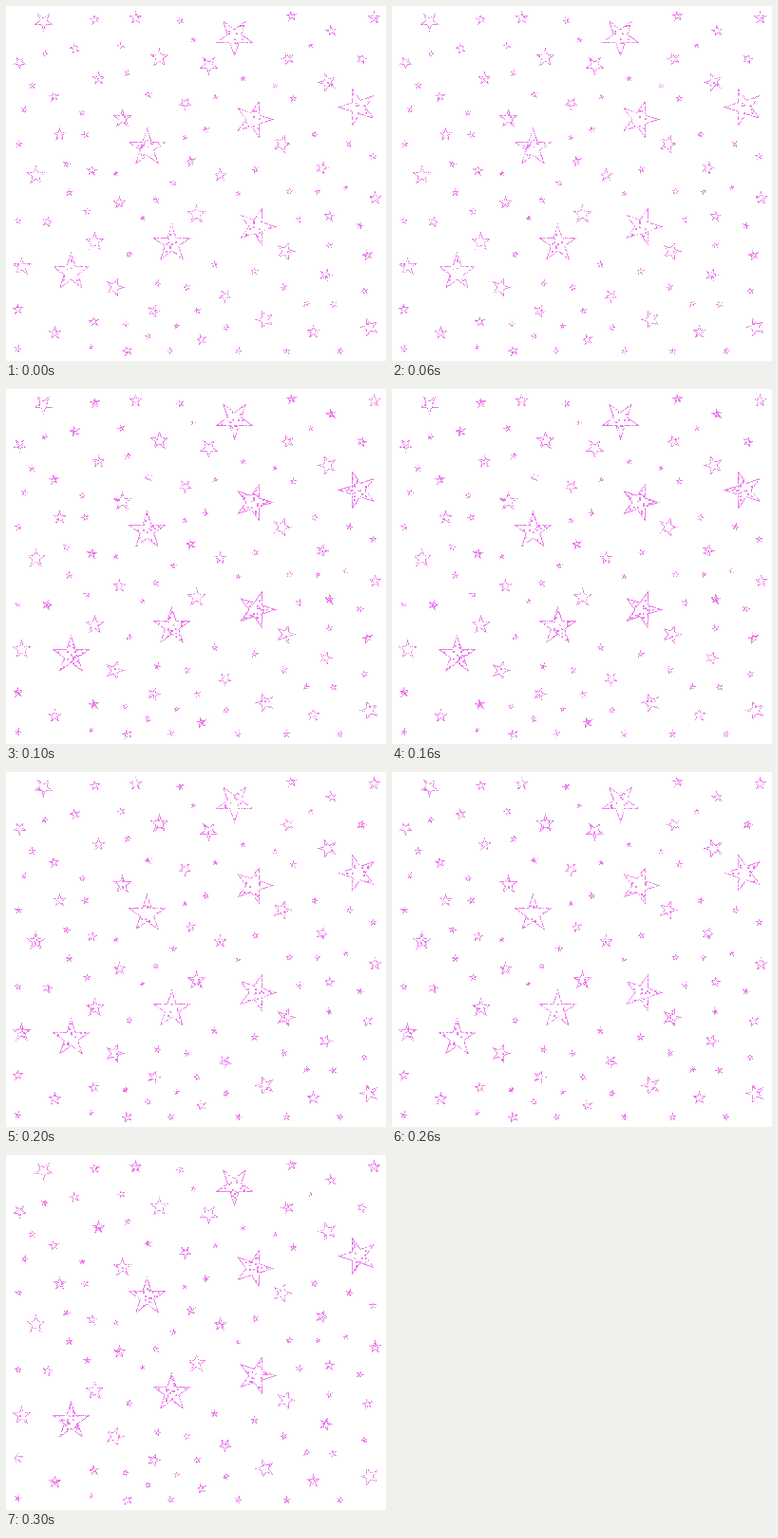
Write an HTML page with a canvas that moves like this. It is 400 px wide and 374 px high and loops after 400 ms.

```html
<!DOCTYPE html>
<html lang="en">
<head>
<meta charset="utf-8">
<title>Glitter stars</title>
<style>
  html, body { margin: 0; width: 100%; height: 100%; overflow: hidden; background: #fff; }
  canvas { display: block; width: 400px; height: 374px; image-rendering: pixelated; }
</style>
</head>
<body>
<canvas id="sky" width="400" height="374"></canvas>
<script>
const ctx = document.getElementById('sky').getContext('2d');
const W = 400, H = 374, STEP = 100, STEPS = 4;
const COLORS = ['#ee82ee', '#e878e8', '#f090f0', '#e668e4'];
const UP = 0, RIGHT = 1, DOWN = 2, LEFT = 3; // quarter turns

// Stars of one size flare together in the listed steps; calm and flare are the lit share inside.
const LARGE  = { r: 21.5, steps: [1, 3], calm: .08, flare: .16 };
const MEDIUM = { r: 11,   steps: [2],    calm: .03, flare: .18 };
const SMALL  = { r: 7.8,  steps: [3],    calm: .06, flare: .3 };
const TINY   = { r: 6.4,  steps: [1],    calm: .1,  flare: .6 };
const SPECK  = { r: 4.5,  steps: [2, 3], calm: .2,  flare: .35 };
const DOT    = { r: 3.5,  steps: [0],    calm: .2,  flare: .6 };

function noise(x, y, k) {
  let h = Math.imul(x + 71, 374761393) ^ Math.imul(y + 37, 668265263) ^ Math.imul(k + 11, 1274126177);
  h = Math.imul(h ^ (h >>> 13), 1274126177);
  h = Math.imul(h ^ (h >>> 16), 2246822519);
  return ((h ^ (h >>> 15)) >>> 0) / 4294967296;
}

const stars = [];

function place(size, turn, ...points) {
  for (const [x, y] of points) stars.push({ size, turn, x, y });
}

// Put each new star in the widest gap among random candidates.
function scatter(size, count) {
  const gap = (x, y) => Math.min(...stars.map(s => Math.hypot(s.x - x, s.y - y) - s.size.r));
  for (let i = 0; i < count; i++) {
    let best = { gap: -Infinity };
    for (let c = 0; c < 150; c++) {
      const x = Math.round(11 + noise(c, i, size.r * 10) * (W - 23));
      const y = Math.round(9 + noise(c, i, size.r * 20) * (H - 20));
      const room = gap(x, y);
      if (room > best.gap) best = { gap: room, x, y };
    }
    place(size, (noise(best.x, best.y, 99) - .5) * .4, [best.x, best.y]);
  }
}

place(LARGE, UP, [148, 149], [174, 250], [68, 280]);
place(LARGE, RIGHT, [260, 119], [263, 232]);
place(LARGE, DOWN, [240, 32]);
place(LARGE, LEFT, [370, 106]);
place(MEDIUM, UP, [161, 54], [122, 118], [31, 178], [200, 219], [93, 248], [16, 274]);
place(MEDIUM, RIGHT, [290, 145], [294, 258], [114, 296]);
place(MEDIUM, DOWN, [39, 16], [213, 62]);
place(MEDIUM, LEFT, [338, 80], [272, 330], [382, 338]);
place(SMALL, UP, [136, 12], [387, 12], [97, 76], [56, 135], [225, 178], [119, 207],
  [388, 202], [323, 343], [51, 344]);
place(SMALL, RIGHT, [332, 170], [336, 283], [155, 321]);
place(SMALL, DOWN, [14, 59], [188, 102], [230, 305]);
place(SMALL, LEFT, [296, 55]);
scatter(TINY, 15);
scatter(SPECK, 44);
scatter(DOT, 13);

// A point lies in a pentagram when it is beyond at most one of its five lines.
function inStar(x, y, r, turn) {
  let beyond = 0;
  for (let i = 0; i < 5; i++) {
    const a = (turn - 1) * Math.PI / 2 + i * Math.PI * .4;
    if (x * Math.cos(a) + y * Math.sin(a) > r * .309) beyond++;
  }
  return beyond < 2;
}

function trace({ size, turn, x: cx, y: cy }) {
  const inside = (x, y) => inStar(x, y, size.r, turn);
  const pixels = [], reach = Math.ceil(size.r);
  for (let y = -reach; y <= reach; y++) {
    for (let x = -reach; x <= reach; x++) {
      if (!inside(x, y)) continue;
      const edge = !(inside(x - 1, y) && inside(x + 1, y) && inside(x, y - 1) && inside(x, y + 1));
      pixels.push({ x: cx + x, y: cy + y, edge });
    }
  }
  return pixels;
}

for (const s of stars) s.pixels = trace(s);

// Edges sparkle pixel by pixel, insides in clumps of two by two.
function isLit({ x, y, edge }, size, step) {
  const flaring = size.steps.includes(step);
  if (edge) return noise(x, y, step) < (flaring ? .85 : .74);
  return noise(x >> 1, y >> 1, step) < (flaring ? size.flare : size.calm) * 1.25
    && noise(x, y, step) < .8;
}

function draw(step) {
  ctx.fillStyle = '#fff';
  ctx.fillRect(0, 0, W, H);
  for (const { size, pixels } of stars) {
    for (const p of pixels) {
      if (!isLit(p, size, step)) continue;
      ctx.fillStyle = COLORS[Math.floor(noise(p.x, p.y, step + 20) * COLORS.length)];
      ctx.fillRect(p.x, p.y, 1, 1);
    }
  }
}

const start = performance.now();
let shown = 0;
function tick() {
  const step = Math.floor((performance.now() - start) / STEP) % STEPS;
  if (step !== shown) draw(shown = step);
  requestAnimationFrame(tick);
}
draw(0);
requestAnimationFrame(tick);
</script>
</body>
</html>
```
